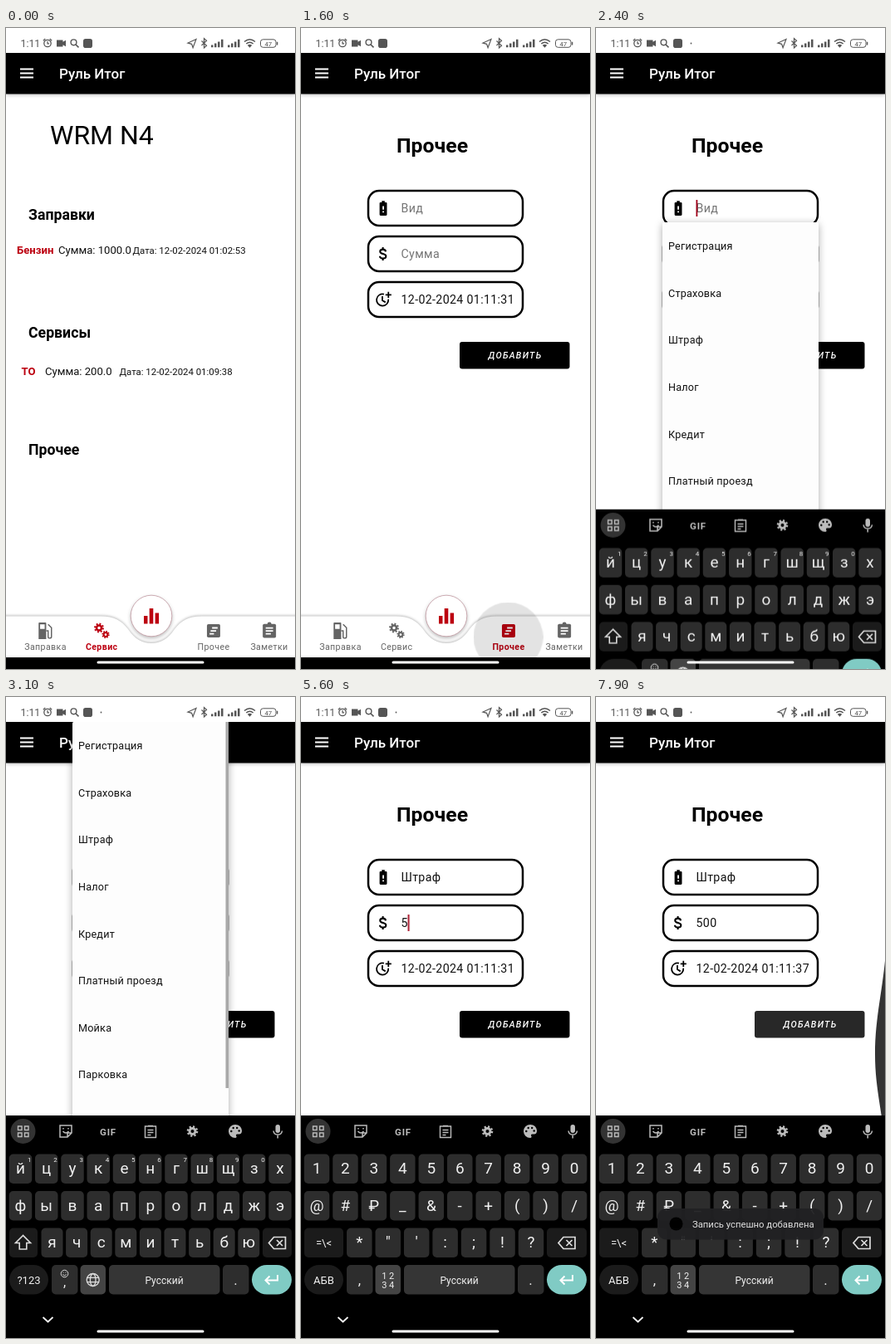
An HTML page for the animation above (8 s loop, 348 px wide and 772 px high).

```html
<!DOCTYPE html>
<html lang="ru">
<head>
<meta charset="utf-8">
<title>Руль Итог</title>
<style>
html, body { margin: 0; height: 100%; overflow: hidden; background: #fff; }
svg.stage { display: block; width: 100vw; height: 100vh; font-family: Roboto, Arial, sans-serif; }
.mid { text-anchor: middle; }
.h { font-weight: 700; font-size: 17.7px; }
.red { fill: #bc0010; font-weight: 700; font-size: 13.1px; }
.sum { font-size: 13.1px; fill: #111; }
.date { font-size: 11.4px; fill: #111; }
.field { fill: #fff; stroke: #000; stroke-width: 2.5; }
.val { font-size: 14.2px; letter-spacing: .35px; fill: #111; }
.hint { fill: #757575; }
.line { fill: none; stroke: currentColor; stroke-width: 2; }
.tab { color: #646464; fill: currentColor; font-size: 10.6px; letter-spacing: .4px; }
.item { font-size: 12.6px; letter-spacing: .22px; fill: #111; }

/* One loop is 8 s, so 1.25% is 100 ms */
[class*="a-"] { animation: 8s step-end infinite; }
.a-home { animation-name: home; }
.a-form { animation-name: form; }
.a-service { animation-name: service; }
.a-other { animation-name: other; }
.a-ripple { animation-name: ripple; animation-timing-function: ease-out; }
.a-dot { animation-name: dot; }
.a-kind0 { animation-name: kind0; }
.a-kind1 { animation-name: kind1; }
.a-sum0 { animation-name: sum0; }
.a-sum1 { animation-name: sum1; }
.a-sum2 { animation-name: sum2; }
.a-sum3 { animation-name: sum3; }
.a-time0 { animation-name: time0; }
.a-time1 { animation-name: time1; }
.a-caret0 { animation-name: caret0; }
.a-caret { animation-name: blink, caret; }
.a-popup { animation-name: popup; animation-timing-function: linear; }
.a-lift { animation-name: lift; }
.a-bar { animation-name: bar; }
.a-board { animation-name: board; animation-timing-function: cubic-bezier(.3, .4, .2, 1); }
.a-abc { animation-name: abc; }
.a-sym { animation-name: sym; }
.a-mode { animation-name: mode; }
.a-k5 { animation-name: k5; }
.a-k0 { animation-name: k0; }
.a-press { animation-name: press; animation-timing-function: linear; }
.a-edge { animation-name: edge; animation-timing-function: ease-out; }
.a-toast { animation-name: toast; animation-timing-function: linear; }

@keyframes home { 15% { opacity: 0 } }
@keyframes form { 0% { opacity: 0 } 15% { opacity: 1 } }
@keyframes service { 0% { color: #bc0010; font-weight: 700 } 15% { color: #646464; font-weight: 400 } }
@keyframes other { 15% { color: #bc0010; font-weight: 700 } }
@keyframes ripple {
  0%, 12.4% { opacity: 0; transform: scale(.3) }
  12.5% { opacity: 1; transform: scale(.3) }
  18% { transform: scale(1) }
  20.3% { opacity: 1 }
  22.5%, 100% { opacity: 0; transform: scale(1) }
}
@keyframes dot { 0% { opacity: 0 } 30% { opacity: 1 } }
@keyframes kind0 { 42.5% { opacity: 0 } }
@keyframes kind1 { 0% { opacity: 0 } 42.5% { opacity: 1 } }
@keyframes sum0 { 68.7% { opacity: 0 } }
@keyframes sum1 { 0% { opacity: 0 } 68.7% { opacity: 1 } 76.2% { opacity: 0 } }
@keyframes sum2 { 0% { opacity: 0 } 76.2% { opacity: 1 } 78.7% { opacity: 0 } }
@keyframes sum3 { 0% { opacity: 0 } 78.7% { opacity: 1 } }
@keyframes time0 { 95% { opacity: 0 } }
@keyframes time1 { 0% { opacity: 0 } 95% { opacity: 1 } }
@keyframes caret0 { 0% { opacity: 0 } 25% { opacity: 1 } 42.5% { opacity: 0 } }
@keyframes blink {
  0%, 55%, 67.4%, 86.2%, 98.6% { opacity: 0 }
  49.8%, 61.2%, 68.7%, 92.4% { opacity: 1 }
}
@keyframes caret {
  68.7% { transform: translateX(8.2px) }
  76.2% { transform: translateX(16.6px) }
  78.7% { transform: translateX(24.8px) }
}
@keyframes popup { 0%, 25.4% { opacity: 0 } 27.3%, 42.4% { opacity: 1 } 46.3%, 100% { opacity: 0 } }
@keyframes lift { 37.4% { transform: translateY(-204px) } }
@keyframes bar { 0% { opacity: 0 } 37.4% { opacity: 1 } }
@keyframes board {
  0%, 26.5% { opacity: 0; transform: translateY(268px) }
  27.4%, 27.7% { opacity: .5; transform: translateY(249px) }
  29% { opacity: 1 }
  34.5%, 100% { opacity: 1; transform: none }
}
@keyframes abc { 62.4% { opacity: 0 } }
@keyframes sym { 0% { opacity: 0 } 62.4% { opacity: 1 } }
@keyframes mode { 61.2% { fill: #555 } 62.4% { fill: #1b1b1b } }
@keyframes k5 { 67.4% { fill: #666 } 69.5% { fill: #2d2d2d } }
@keyframes k0 { 75% { fill: #666 } 76.2% { fill: #2d2d2d } 77.5% { fill: #666 } 79.5% { fill: #2d2d2d } }
@keyframes press { 0%, 93.5% { fill: #000 } 96%, 100% { fill: #282828 } }
@keyframes edge { 0%, 95% { transform: translateX(16px) } 98.6%, 100% { transform: none } }
@keyframes toast { 0%, 96% { opacity: 0 } 98.6%, 100% { opacity: .95 } }
</style>
</head>
<body>
<svg class="stage" viewBox="0 0 348 772">
  <defs>
    <symbol id="gear" viewBox="0 0 24 24">
      <circle class="line" cx="12" cy="12" r="5.2" style="stroke-width:4.4"/>
      <circle class="line" cx="12" cy="12" r="8.4" pathLength="16" stroke-dasharray="1" style="stroke-width:3.6"/>
    </symbol>
    <symbol id="pump" viewBox="0 0 24 24">
      <path fill-rule="evenodd" d="M3 2q0-1 1-1h8q1 0 1 1v21H3zM5 3.500v6h6v-6z"/>
      <path class="line" d="M13 12h2.500v7.500a2.200 2.200 0 0 0 4.400 0V8L15.500 3.500" style="stroke-width:1.600"/>
    </symbol>
    <symbol id="feed" viewBox="0 0 24 24">
      <rect x="3" y="3" width="18" height="18" rx="2"/>
      <path d="M10 8h7.500M8 12h7.500M6.500 16h6" stroke="#fff" stroke-width="2"/>
    </symbol>
    <symbol id="notes" viewBox="0 0 24 24">
      <rect x="3" y="3" width="18" height="19" rx="2"/><circle cx="12" cy="3.500" r="2.800"/>
      <path d="M7 8.500h10M7 12.500h10M7 16.500h7" stroke="#fff" stroke-width="1.900"/>
    </symbol>
    <symbol id="battery" viewBox="0 0 24 24">
      <path fill-rule="evenodd" d="M10 2h4v2h1.700q1.300 0 1.300 1.300v15.400q0 1.300-1.300 1.300H8.300Q7 22 7 20.700V5.300Q7 4 8.300 4H10zM11 9v5h2V9zM11 16v2h2v-2z"/>
    </symbol>
    <symbol id="dollar" viewBox="0 0 24 24">
      <path class="line" d="M15.300 9C15.200 7 13.700 5.900 11.500 5.900c-2.300 0-3.800 1.100-3.800 2.900 0 4.300 8 2.200 8 6.500 0 1.900-1.700 2.900-4.100 2.900-2.500 0-4.100-1.100-4.200-3.200M11.500 3v3M11.500 18v3" style="stroke-width:2.300"/>
    </symbol>
    <symbol id="clock" viewBox="0 0 24 24">
      <path class="line" d="M13 5.250A8 8 0 1 0 18.900 12M10.750 8v5.600l4.300 2.600M19 2v8M15 6h8"/>
    </symbol>
    <symbol id="signal" viewBox="0 0 16 10"><path d="M0 10V7h2.500v3zM4 10V5h2.500v5zM8 10V3h2.500v7zM12 10V0h2.500v10z"/></symbol>
    <symbol id="erase" viewBox="0 0 24 24">
      <path class="line" d="M8 5h14v14H8L2 12zM11.500 8.500l7 7M18.500 8.500l-7 7" style="stroke-width:1.700"/>
    </symbol>
  </defs>

  <rect width="348" height="772" fill="#fff"/>

  <g class="a-home">
    <text x="53" y="140" font-size="32">WRM N4</text>
    <g class="h"><text x="27" y="231">Заправки</text><text x="27" y="373">Сервисы</text><text x="27" y="514">Прочее</text></g>
    <text class="red" x="13" y="272">Бензин</text>
    <text class="sum" x="63" y="272">Сумма: 1000.0</text>
    <text class="date" x="152.500" y="272">Дата: 12-02-2024 01:02:53</text>
    <text class="red" x="18.500" y="418">ТО</text>
    <text class="sum" x="47" y="418">Сумма: 200.0</text>
    <text class="date" x="136.500" y="418">Дата: 12-02-2024 01:09:38</text>
  </g>

  <g class="a-form">
    <text x="115" y="150" font-size="24.800" font-weight="700">Прочее</text>
    <g class="field">
      <rect x="81" y="196" width="186" height="42" rx="13"/>
      <rect x="81" y="251" width="186" height="42" rx="13"/>
      <rect x="81" y="306" width="186" height="42" rx="13"/>
    </g>
    <use href="#battery" x="88.400" y="206.400" width="21.300" height="21.300"/>
    <use href="#dollar" x="88.400" y="261.400" width="21.300" height="21.300"/>
    <use href="#clock" x="88.400" y="316" width="21.300" height="21.300"/>
    <g class="val">
      <text class="hint a-kind0" x="120.500" y="222">Вид</text>
      <text class="a-kind1" x="120.500" y="222">Штраф</text>
      <text class="hint a-sum0" x="120.500" y="277">Сумма</text>
      <text class="a-sum1" x="120.500" y="277">5</text>
      <text class="a-sum2" x="120.500" y="277">50</text>
      <text class="a-sum3" x="120.500" y="277">500</text>
      <text class="a-time0" x="120.500" y="332">12-02-2024 01:11:31</text>
      <text class="a-time1" x="120.500" y="332">12-02-2024 01:11:37</text>
    </g>
    <g fill="#a00018">
      <rect class="a-caret0" x="120.500" y="207" width="1.800" height="20"/>
      <rect class="a-caret" x="120.500" y="262" width="1.800" height="20"/>
    </g>
    <rect class="a-press" x="191" y="378" width="132.500" height="32.500" rx="3"/>
    <text class="mid" x="258" y="398" fill="#fff" font-size="10.700" font-weight="500" font-style="italic" letter-spacing="1.250">ДОБАВИТЬ</text>
  </g>

  <rect y="30" width="348" height="49.500" style="filter:drop-shadow(0 1px 2px #0004)"/>
  <path d="M17 49.500h16M17 54.500h16M17 59.500h16" stroke="#fff" stroke-width="1.800"/>
  <text x="64" y="61" fill="#fff" font-size="17" font-weight="500">Руль Итог</text>

  <path fill="#fff" style="filter:drop-shadow(0 -1px 1.500px #0004)" d="M-5 708.500H114C131 708.500 139 714 147 724C155 736 164 741 175 741S195 736 203 724C211 714 219 708.500 236 708.500H353V765H-5z"/>
  <g class="tab mid">
    <use href="#pump" x="36.500" y="715" width="22" height="22"/><text x="47.500" y="749">Заправка</text>
    <g class="a-service">
      <use href="#gear" x="105" y="715.500" width="14" height="14"/><use href="#gear" x="114.500" y="725" width="11" height="11"/>
      <text x="115.200" y="749">Сервис</text>
    </g>
    <g class="a-other"><use href="#feed" x="239.300" y="715.400" width="21.300" height="21.300"/><text x="250" y="749">Прочее</text></g>
    <use href="#notes" x="306.500" y="715" width="21.300" height="21.300"/><text x="317" y="749">Заметки</text>
  </g>
  <g transform="translate(249.500 733.500)"><circle class="a-ripple" r="42" fill="#000" fill-opacity=".11"/></g>
  <circle cx="175" cy="708" r="24.800" fill="#fff" stroke="#b98a94" stroke-width=".7" style="filter:drop-shadow(0 2px 2px #0004)"/>
  <path fill="#bc0010" d="M166 708h4.500v9.500H166zM172.700 699h4.600v18.500h-4.600zM179.600 704.500h4.500v13h-4.500z"/>
  <rect y="758" width="348" height="14"/>

  <g class="a-popup"><g class="a-lift">
    <rect x="80" y="234" width="188" height="509" rx="1.500" fill="#fdfdfd" style="filter:drop-shadow(0 2px 5px #0005)"/>
    <g id="list" class="item"></g>
    <rect class="a-bar" x="264.500" y="234" width="3.500" height="441" fill="#a9a9a9"/>
  </g></g>

  <path class="a-edge" fill="#333" d="M349 306C346 350 336 385 336 430S346 500 349 554z"/>

  <rect width="348" height="30" fill="#fff"/>
  <g fill="#555" color="#555">
    <text x="17.500" y="23" font-size="12.300">1:11</text>
    <circle class="line" cx="50" cy="18.500" r="4.200" style="stroke-width:1.300"/>
    <path class="line" d="M50 16v2.800h2M44.800 15.200l2.500-2.200M55.200 15.200l-2.500-2.200" style="stroke-width:1.200"/>
    <path d="M61 14.500h7.500v2.300l3.500-2v7.400l-3.500-2v2.300H61z"/>
    <circle class="line" cx="81.500" cy="17.300" r="3.400" style="stroke-width:1.400"/>
    <path class="line" d="M84 20l3.500 3.300" style="stroke-width:1.600"/>
    <rect x="93" y="13" width="11" height="11" rx="2.800"/>
    <circle class="a-dot" cx="114.500" cy="18.500" r=".9"/>
    <path class="line" d="M229 13.500L219 18l4.600 1.300 1.500 4.500z" style="stroke-width:1.200"/>
    <path class="line" d="M235.500 15.500l6 5.800-3 2.700V12.500l3 2.700-6 5.800" style="stroke-width:1.200"/>
    <use href="#signal" x="247" y="13.500" width="16" height="10"/>
    <use href="#signal" x="267" y="13.500" width="16" height="10"/>
    <path class="line" d="M287 16.500q6.500-5.500 13 0M289.300 19q4.200-3.500 8.400 0" style="stroke-width:1.500"/>
    <path d="M290.800 20.800q2.700-2 5.400 0l-2.700 3z"/>
    <rect class="line" x="306.500" y="13.800" width="18.500" height="9.500" rx="3" style="stroke-width:1"/>
    <path d="M326 16.800h1.300v3.600H326z"/>
    <text class="mid" x="315.800" y="21.500" font-size="7.800">47</text>
  </g>

  <g class="a-board">
    <rect y="504" width="348" height="270"/>
    <g fill="#bcbcbc" color="#bcbcbc">
      <circle cx="20.500" cy="523" r="15" fill="#333"/>
      <path class="line" d="M14.500 517h4.500v4.500h-4.500zM22.500 517H27v4.500h-4.500zM14.500 525H19v4.500h-4.500zM22.500 525H27v4.500h-4.500z" style="stroke-width:1.400"/>
      <path class="line" d="M65 516h14v9l-5 5h-9zM79 525h-5v5M68.500 523q3.500 4 7 0M69 519v1.500M75 519v1.500" style="stroke-width:1.500"/>
      <text class="mid" x="123" y="527.500" font-size="11.500" font-weight="700" letter-spacing=".8">GIF</text>
      <path class="line" d="M167.500 517h13v13.500h-13zM171 516.500h6M170.500 521.500h7M170.500 524.500h7M170.500 527.500h4" style="stroke-width:1.400"/>
      <use href="#gear" x="216.500" y="515" width="16" height="16"/>
      <path d="M276 515a8 8 0 0 0 0 16c2 0 1.800-1.800 1.200-2.600-.5-.9 0-1.800 1.300-1.800h2.300c2 0 3.200-1.600 3.200-4C284 518 280.500 515 276 515z"/>
      <g fill="#000"><circle cx="271.300" cy="523" r="1.200"/><circle cx="273.700" cy="519" r="1.200"/><circle cx="278.200" cy="519" r="1.200"/><circle cx="280.700" cy="522.500" r="1.200"/></g>
      <rect x="324.500" y="515" width="5.500" height="10" rx="2.700"/>
      <path class="line" d="M322 522.500a5.300 5.300 0 0 0 10.500 0M327.200 528v3.500" style="stroke-width:1.500"/>
    </g>
    <g id="keys" class="mid" fill="#f0f0f0" color="#ddd"></g>
    <path d="M44.500 747l6 5.500 6-5.500" fill="none" stroke="#fff" stroke-width="1.700"/>
  </g>

  <g class="a-toast">
    <rect x="74" y="616" width="200" height="37.500" rx="11" fill="#212123"/>
    <circle cx="96.500" cy="634.500" r="8" fill="#000"/>
    <text x="116" y="638.500" font-size="11.300" fill="#eee">Запись успешно добавлена</text>
  </g>
  <rect x="109.500" y="762.500" width="129" height="3" rx="1.500" fill="#fff"/>
</svg>
<script>
const $ = id => document.getElementById(id);
const DARK = '#1b1b1b', KEY = '#2d2d2d';

const kinds = ['Регистрация', 'Страховка', 'Штраф', 'Налог', 'Кредит', 'Платный проезд', 'Мойка', 'Парковка', 'Гос.ТО'];
$('list').innerHTML = kinds.map((k, i) => `<text x="87" y="${267.3 + i * 56.55}">${k}</text>`).join('');

const text = (x, y, size, s) => `<text x="${x}" y="${y}" font-size="${size}">${s}</text>`;
const box = (x, y, w, fill = KEY, rx = 5, cls = '') =>
  `<rect class="${cls}" x="${x}" y="${y}" width="${w}" height="35.5" rx="${rx}" fill="${fill}"/>`;
const safe = c => ({ '&': '&amp;', '<': '&lt;' })[c] || c;

function row(chars, y, first, pitch, w, size = 19) {
  return [...chars].map((c, i) => {
    const x = first + i * pitch;
    const cls = c === '5' || c === '0' ? 'a-k' + c : '';
    return box(x - w / 2, y, w, KEY, 5, cls) + text(x, y + 23.5, size, safe(c));
  }).join('');
}

const erase = x => `<use href="#erase" x="${x - 12}" y="645.5" width="24" height="24"/>`;

const common = box(55, 684, 31.5) + box(89.5, 684, 30.5, '#444') + box(124, 684, 133.5, '#353535') +
  box(261, 684, 31.5) + box(296, 684, 48, '#80cbc4', 18) +
  text(190.5, 706.5, 12, 'Русский') + text(276.5, 708, 17, '.') +
  '<path d="M327 696v6.500h-14M317.500 697.500l-5 5 5 5" fill="none" stroke="#fff" stroke-width="2"/>';

const hints = [...'1234567890'].map((c, i) => text(28.3 + i * 31.25, 559.5, 8, c)).join('');
const abc = row('йцукенгшщзх', 550.5, 17.5, 31.25, 27.5) + hints +
  row('фывапролджэ', 595, 17.5, 31.25, 27.5) +
  box(4, 639.5, 34, DARK) + row('ячсмитьбю', 639.5, 55.5, 29.6, 26) + box(309, 639.5, 35, DARK) + erase(326.5) +
  '<path d="M20.500 648.500l-9 9h4.700v7.500h8.600v-7.500h4.700z" fill="none" stroke="#ddd" stroke-width="1.600"/>' +
  box(4, 684, 47, DARK, 18, 'a-mode') + text(27.5, 707, 13, '?123') +
  '<circle class="line" cx="70.500" cy="694.500" r="4.300" style="stroke-width:1"/>' +
  '<path class="line" d="M68.300 695.500q2.200 2.600 4.400 0M69 692.500v1M72 692.500v1" style="stroke-width:1"/>' +
  text(70.5, 710, 16, ',') +
  '<g class="line" style="stroke-width:1.300"><circle cx="104.700" cy="702" r="7.500"/>' +
  '<ellipse cx="104.700" cy="702" rx="3.300" ry="7.500"/><path d="M98 699.300h13.500M98 704.700h13.500"/></g>';

const sym = row('1234567890', 550.5, 19, 34.45, 30.5) + row('@#₽_&-+()/', 595, 19, 34.45, 30.5) +
  box(4, 639.5, 47, DARK) + text(27.5, 662, 13, '=\\&lt;') +
  row('*"\':;!?', 639.5, 70.3, 34.45, 30.5) + box(296, 639.5, 48, DARK) + erase(320) +
  box(4, 684, 47, DARK, 18) + text(27.5, 707, 13, 'АБВ') + text(70.5, 708, 17, ',') +
  text(104.7, 700.5, 11, '1 2') + text(104.7, 711.5, 11, '3 4');

$('keys').innerHTML = common + `<g class="a-abc">${abc}</g><g class="a-sym">${sym}</g>`;
</script>
</body>
</html>
```
